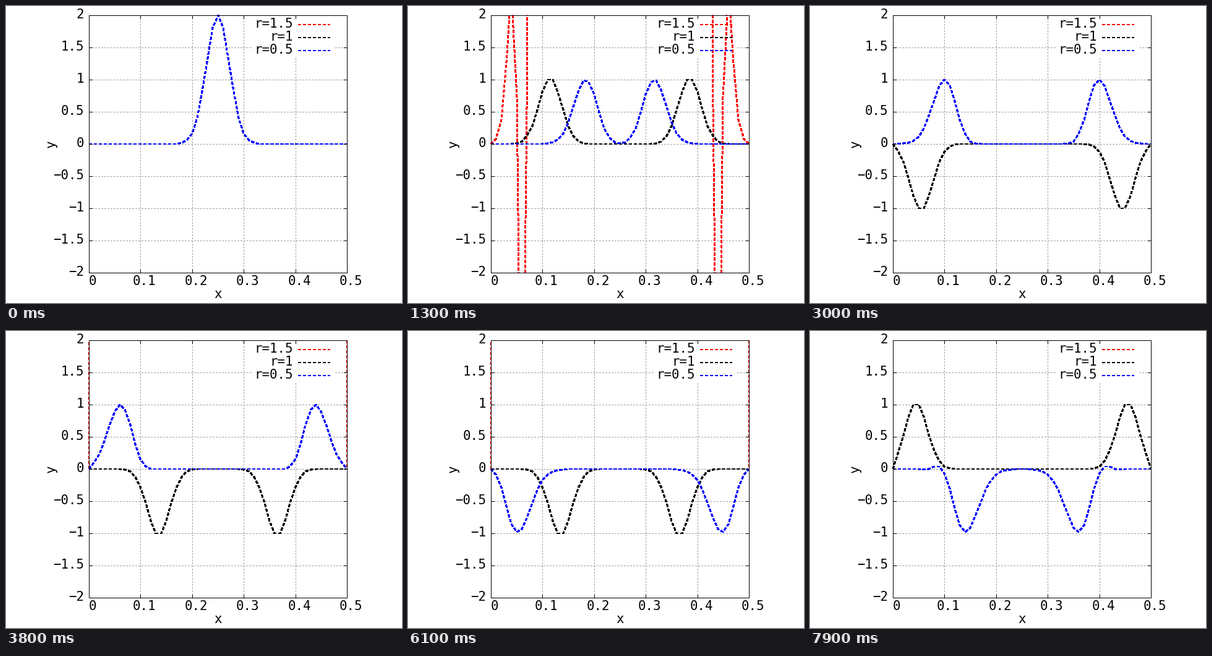
A matplotlib script that plays this animation: 640 px wide and 480 px high, repeating every 8000 ms.

```python
import matplotlib.pyplot as plt
import numpy as np
from matplotlib.animation import FuncAnimation

# Explicit finite differences for a fixed string, at three Courant numbers.
W, H, DPI = 640, 480, 80
PX = 72 / DPI                          # one pixel in points
LEFT, RIGHT, TOP, BOTTOM = 134, 551, 15, 431
FRAMES, CELLS = 80, 50
YMAX, LOWEST = 2.0, -1e6               # steeper falls than this are not drawn
CURVES = [(1.5, "#ff0000"), (1.0, "#000000"), (0.5, "#0000ff")]
DASH = (0, (2, 1.5))
SIZE = 20.7
ADVANCE = 0.602 * SIZE                 # character step of the mono font

plt.rcParams["path.simplify"] = False
plt.rcParams["font.family"] = "DejaVu Sans Mono"
plt.rcParams["font.size"] = SIZE * PX


def px(x):
    return np.floor(LEFT + (RIGHT - LEFT) * np.asarray(x) / 0.5 + 0.5)


def py(y):
    return np.floor(BOTTOM - (BOTTOM - TOP) * (np.asarray(y) + YMAX) / (2 * YMAX) + 0.5)


def simulate(r):
    """Wave heights for every step, starting from rest."""
    j = np.arange(CELLS + 1)
    now = 2 * np.exp(-0.1 * (j - CELLS // 2) ** 2)
    old = now.copy()
    steps = []
    for _ in range(FRAMES):
        steps.append(now)
        new = now.copy()
        bend = now[2:] - 2 * now[1:-1] + now[:-2]
        new[1:-1] = 2 * now[1:-1] - old[1:-1] + r * r * bend
        old, now = now, new
    return steps


def cut(x0, y0, x1, y1):
    """Point where the way from an inner to an outer node leaves the plot."""
    edge = np.copysign(YMAX, y1)
    return x0 + (x1 - x0) * (edge - y0) / (y1 - y0), edge


def clipped(ys):
    """Polyline in pixels; stretches with both ends outside are left out."""
    xs = np.linspace(0, 0.5, CELLS + 1)
    inside = np.abs(ys) <= YMAX
    pts = []
    for i in range(CELLS + 1):
        here = (xs[i], ys[i])
        if not inside[i]:
            continue
        if i and not inside[i - 1] and ys[i - 1] > LOWEST:
            pts.append(cut(*here, xs[i - 1], ys[i - 1]))
        pts.append(here)
        if i < CELLS and not inside[i + 1]:
            if ys[i + 1] > LOWEST:
                pts.append(cut(*here, xs[i + 1], ys[i + 1]))
            pts.append((np.nan, np.nan))
    x, y = np.array(pts).T
    return px(x), py(y)


fig = plt.figure(figsize=(W / DPI, H / DPI), dpi=DPI, facecolor="white")
ax = fig.add_axes([0, 0, 1, 1])
ax.set_xlim(0, W)
ax.set_ylim(H, 0)
ax.axis("off")


def line(xs, ys, color="black", width=1, z=5, **kw):
    """Hard-edged line; thin ones run through pixel centres."""
    off = 0.5 * (width % 2)
    return ax.plot(np.add(xs, off), np.add(ys, off), color=color, lw=width * PX,
                   zorder=z, solid_capstyle="butt", dash_capstyle="butt",
                   antialiased=False, snap=False, **kw)[0]


def dotted(xs, ys):
    line(xs, ys, "#a0a0a0", z=1, ls=(0, (2 / PX, 2 / PX)))


def label(s, right, base):
    ax.text(right - ADVANCE * len(s), base, s, ha="left", va="baseline", zorder=2)


def number(v):
    return f"{v:g}".replace("-", "\u2212")


# Grid, ticks and numbers; the grid stops at the key.
KEY_L, KEY_R, KEY_B = 397, 532, 81
for k in range(6):
    x = float(px(k / 10))
    if 0 < k < 5:
        dotted([x, x], [BOTTOM, KEY_B if KEY_L < x < KEY_R else TOP])
        line([x, x], [BOTTOM, BOTTOM - 5])
        line([x, x], [TOP, TOP + 5])
    s = number(k / 10)
    label(s, x + ADVANCE * (len(s) + 1) / 2, 451)

for k in range(9):
    v = k / 2 - 2
    y = float(py(v))
    if 0 < k < 8:
        if y < KEY_B:
            dotted([LEFT, KEY_L], [y, y])
            dotted([KEY_R, RIGHT], [y, y])
        else:
            dotted([LEFT, RIGHT], [y, y])
        line([LEFT, LEFT + 5], [y, y])
        line([RIGHT, RIGHT - 5], [y, y])
    label(number(v), 126, y + 5)

line([LEFT, RIGHT, RIGHT, LEFT, LEFT], [BOTTOM, BOTTOM, TOP, TOP, BOTTOM],
     solid_joinstyle="miter")
ax.text(342, 472, "x", ha="center", va="baseline")
ax.text(73, 223, "y", ha="center", va="center", rotation=90)

# Key and curves.
waves = []
for k, (r, color) in enumerate(CURVES):
    y = 30 + 21 * k
    label(f"r={r:g}", 464, y + 5)
    line([472, 524], [y, y], color, 2, 3, ls=DASH)
    curve = line([], [], color, 2, 3 + k / 10, ls=DASH)
    waves.append((curve, [clipped(ys) for ys in simulate(r)]))


def draw(n):
    for curve, paths in waves:
        curve.set_data(*paths[n])
    return [curve for curve, _ in waves]


anim = FuncAnimation(fig, draw, frames=FRAMES, interval=100,
                     repeat=True, repeat_delay=0, blit=False)
plt.show()
```
